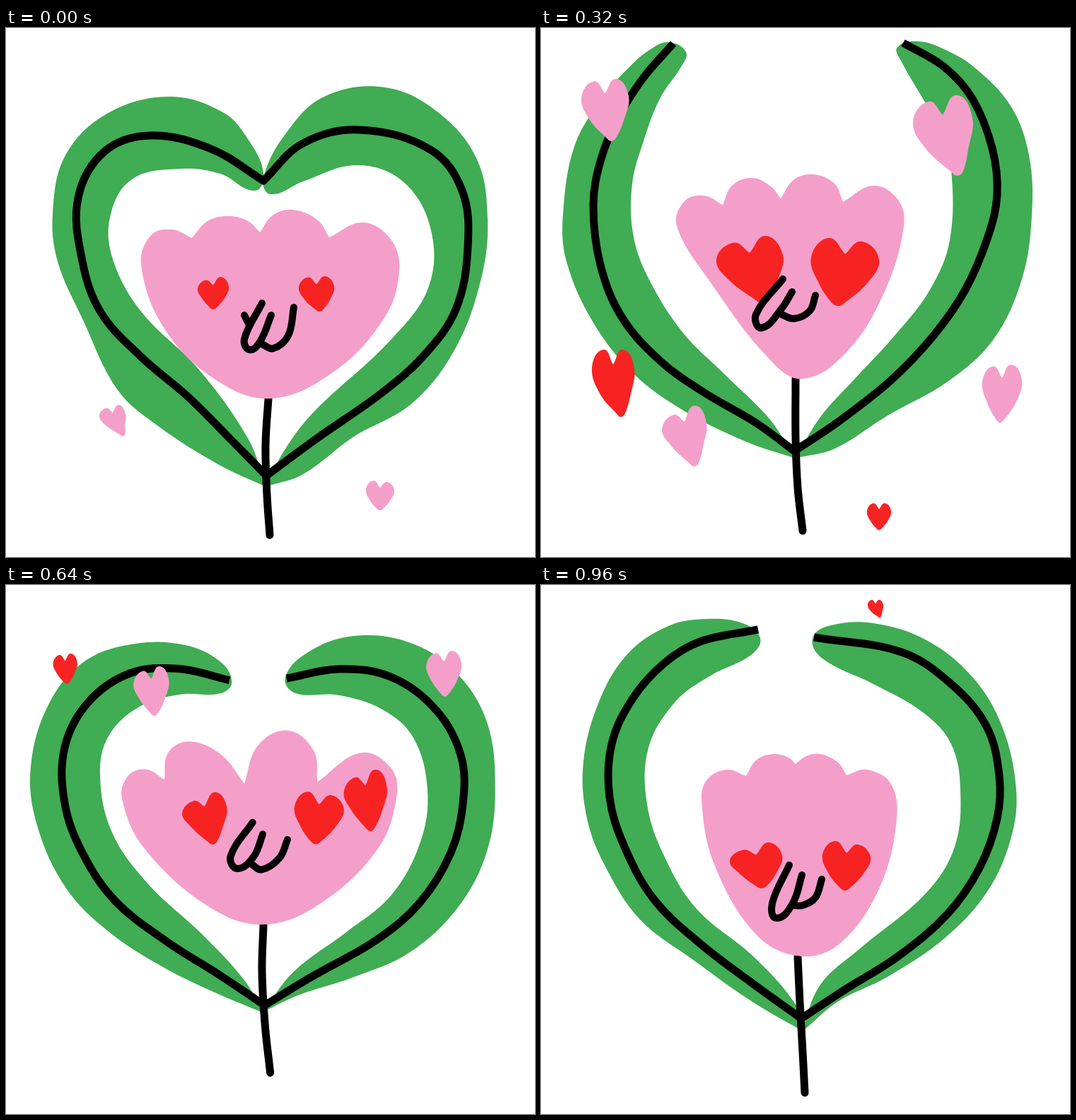
An HTML page with a canvas that plays this animation: 748x748 px, repeating every 1.04 s.

```html
<!DOCTYPE html>
<html lang="en">
<head>
<meta charset="utf-8">
<title>Flower in love</title>
<style>
html, body { margin: 0; width: 100%; height: 100%; overflow: hidden; background: #fff; }
canvas { display: block; width: 748px; height: 748px; }
</style>
</head>
<body>
<canvas id="stage" width="748" height="748"></canvas>
<script>
const ctx = document.getElementById('stage').getContext('2d');
const STEP = 80, STEPS = 13;
const GREEN = '#40ac53', PINK = '#f49fca', RED = '#f72323', BLACK = '#000';

// Hand-drawn poses: tracks[name] holds [step, values] in order.
const tracks = {};
function key(name, step, values) {
  (tracks[name] = tracks[name] || []).push([step, values]);
}

// Leaves: base, outer edge, tip, inner edge.
key('leafL', 0, [368,649, 300,617, 214,562, 158,512, 108,411, 73,330, 66,262, 84,180, 143,121, 231,97, 308,120, 344,160, 364,205, 352,230, 303,206, 248,199, 178,214, 147,268, 152,330, 192,402, 272,482, 342,580]);
key('leafL', 1, [365,623, 300,590, 220,540, 150,481, 90,400, 56,320, 52,250, 78,168, 130,109, 208,89, 280,95, 330,130, 355,172, 342,219, 295,202, 218,189, 160,207, 137,255, 150,325, 205,398, 275,470, 335,555]);
key('leafL', 3, [356,584, 290,558, 200,526, 120,478, 65,415, 28,335, 21,260, 42,170, 85,107, 140,73, 195,57, 235,51, 257,59, 250,74, 200,110, 158,166, 133,215, 127,270, 140,340, 180,408, 250,470, 325,524]);
key('leafL', 4, [358,608, 290,585, 200,540, 130,488, 73,415, 36,330, 31,265, 48,165, 90,95, 125,55, 155,30, 180,20, 205,34, 198,55, 168,100, 145,160, 129,220, 130,290, 150,350, 200,430, 260,490, 325,555]);
key('leafL', 6, [376,637, 300,599, 230,563, 160,508, 105,420, 68,330, 63,240, 100,160, 160,113, 235,102, 300,125, 335,170, 344,215, 320,236, 270,210, 220,198, 175,217, 151,270, 160,350, 210,425, 290,510, 350,585]);
key('leafL', 9, [358,589, 300,568, 220,530, 140,483, 75,433, 32,345, 21,265, 42,170, 90,103, 160,73, 230,65, 285,76, 307,98, 295,112, 235,127, 175,158, 130,212, 124,270, 145,350, 195,420, 270,485, 330,545]);
key('leafL', 12, [374,633, 300,590, 215,530, 140,473, 92,400, 65,330, 60,250, 82,165, 122,98, 180,58, 235,48, 285,54, 310,75, 297,99, 240,128, 190,165, 152,230, 150,310, 175,385, 220,458, 300,525, 358,590]);

key('leafR', 0, [366,649, 420,631, 490,579, 575,530, 636,452, 672,354, 681,270, 666,186, 612,120, 536,84, 450,97, 395,150, 364,212, 374,235, 420,217, 495,194, 560,216, 600,282, 598,365, 545,440, 435,543, 395,595]);
key('leafR', 1, [365,623, 412,606, 490,566, 570,517, 640,430, 679,340, 691,250, 674,155, 622,83, 520,45, 430,69, 380,120, 356,172, 362,210, 430,183, 505,172, 570,192, 612,260, 603,345, 555,425, 470,493, 398,557]);
key('leafR', 3, [358,580, 400,553, 480,536, 575,508, 650,460, 693,375, 712,280, 703,180, 660,98, 600,52, 545,32, 490,25, 458,43, 466,60, 520,93, 575,130, 610,185, 622,250, 610,330, 570,385, 495,455, 410,512]);
key('leafR', 4, [360,608, 415,595, 490,548, 575,500, 640,440, 680,355, 694,265, 690,180, 664,110, 612,55, 570,30, 535,19, 504,27, 510,48, 540,100, 565,145, 580,200, 578,300, 550,370, 500,435, 440,500, 395,550]);
key('leafR', 6, [370,637, 420,618, 490,589, 560,550, 625,490, 660,410, 671,330, 658,235, 610,158, 540,120, 470,117, 410,150, 373,205, 390,248, 440,231, 495,223, 548,238, 588,310, 582,390, 545,475, 480,525, 410,580]);
key('leafR', 9, [360,587, 410,561, 490,538, 575,505, 645,440, 690,360, 702,265, 690,170, 645,102, 580,60, 500,50, 435,68, 406,93, 418,105, 485,118, 550,152, 590,205, 600,280, 588,350, 545,420, 480,475, 405,530]);
key('leafR', 12, [368,633, 420,589, 490,554, 570,500, 630,435, 664,360, 672,290, 652,200, 610,130, 545,78, 470,54, 410,57, 384,75, 398,104, 470,140, 540,180, 580,225, 593,290, 585,370, 545,435, 450,515, 395,565]);

// Veins: base to tip.
key('veinL', 0, [368,633, 318,582, 258,522, 190,464, 134,402, 108,330, 102,240, 140,174, 205,152, 290,171, 364,216]);
key('veinL', 1, [364,612, 320,555, 250,495, 190,450, 135,398, 104,330, 92,240, 115,172, 190,129, 270,133, 355,177]);
key('veinL', 3, [358,565, 300,538, 220,503, 150,458, 105,408, 80,340, 63,270, 72,195, 110,127, 175,80, 250,55]);
key('veinL', 4, [358,598, 305,559, 230,515, 170,472, 115,410, 84,335, 74,250, 85,185, 110,125, 145,70, 187,22]);
key('veinL', 6, [374,625, 310,577, 230,515, 165,448, 115,368, 92,280, 108,205, 160,152, 235,139, 298,173, 342,222]);
key('veinL', 9, [360,578, 300,540, 225,498, 150,447, 105,385, 78,320, 71,240, 95,172, 145,118, 215,91, 303,91]);
key('veinL', 12, [368,613, 300,564, 225,507, 160,445, 118,370, 97,300, 100,225, 130,160, 175,110, 225,80, 307,63]);

key('veinR', 0, [368,633, 440,580, 530,517, 590,464, 636,398, 653,310, 645,230, 600,172, 500,144, 420,163, 364,216]);
key('veinR', 1, [364,612, 440,555, 530,502, 595,435, 645,365, 665,260, 645,180, 585,119, 500,110, 415,132, 355,177]);
key('veinR', 3, [358,563, 425,530, 515,488, 580,444, 630,390, 657,330, 667,260, 660,190, 625,120, 560,65, 462,37]);
key('veinR', 4, [360,597, 420,557, 495,498, 555,435, 600,370, 632,295, 645,235, 638,170, 610,100, 570,55, 512,21]);
key('veinR', 6, [374,625, 450,586, 540,527, 595,468, 637,385, 643,290, 620,225, 560,177, 490,169, 420,188, 374,214]);
key('veinR', 9, [360,580, 425,537, 515,490, 580,440, 625,375, 648,315, 655,250, 635,180, 575,112, 500,84, 408,91]);
key('veinR', 12, [368,613, 430,572, 505,525, 575,465, 620,400, 645,330, 648,270, 630,200, 580,140, 510,95, 386,74]);

key('stem', 0, [371,524, 367,590, 369,660, 373,717]);
key('stem', 1, [361,495, 360,560, 366,645, 380,704]);
key('stem', 3, [364,437, 359,520, 361,600, 368,665]);
key('stem', 4, [360,495, 360,580, 363,650, 370,711]);
key('stem', 6, [368,522, 370,580, 373,650, 373,719]);
key('stem', 9, [362,460, 358,530, 363,610, 374,675]);
key('stem', 12, [363,526, 366,590, 370,660, 373,718]);

// Petals: clockwise from the first notch; notches are points 0, 4 and 8.
key('petals', 0, [263,297, 285,273, 315,266, 342,273, 359,289, 377,265, 405,257, 440,271, 457,296, 505,275, 545,300, 556,345, 535,410, 465,485, 373,524, 290,493, 222,422, 191,335, 205,293, 235,285]);
key('petals', 1, [251,291, 265,252, 300,235, 335,252, 348,281, 365,250, 405,233, 437,250, 448,278, 495,257, 537,280, 549,330, 525,400, 465,462, 368,496, 285,467, 215,390, 177,300, 188,272, 222,265]);
key('petals', 3, [214,245, 217,200, 255,180, 315,207, 357,262, 375,200, 425,166, 460,195, 463,229, 515,215, 555,245, 560,285, 520,318, 432,394, 367,436, 290,392, 178,333, 150,288, 163,253, 190,244]);
key('petals', 4, [257,250, 270,223, 298,212, 325,224, 339,241, 357,215, 385,207, 415,220, 427,246, 470,223, 505,243, 513,280, 487,370, 435,455, 370,496, 320,465, 240,360, 192,280, 203,245, 230,237]);
key('petals', 6, [262,314, 272,275, 300,260, 333,276, 355,314, 378,272, 420,257, 455,278, 467,318, 515,284, 552,305, 556,340, 533,410, 460,490, 375,522, 290,494, 225,425, 190,335, 198,293, 225,282]);
key('petals', 9, [205,256, 208,218, 240,202, 290,222, 328,264, 345,205, 387,180, 425,212, 427,259, 495,214, 540,235, 551,275, 525,350, 445,425, 362,459, 285,435, 180,345, 151,285, 160,258, 185,250]);
key('petals', 12, [290,270, 305,247, 330,239, 350,244, 360,253, 375,242, 395,239, 420,251, 432,269, 460,261, 494,280, 503,330, 480,425, 425,505, 368,525, 305,495, 245,395, 227,305, 235,275, 263,261]);

// Mouth: a loop (5 points), a hook (4) and a short tick (2).
key('mouth', 0, [362,389, 337,440, 345,455, 360,442, 375,406, 362,447, 378,453, 399,435, 407,395, 337,406, 344,420]);
key('mouth', 1, [351,350, 328,400, 332,417, 350,405, 364,375, 352,412, 367,425, 390,415, 402,380, 327,380, 333,391]);
key('mouth', 3, [345,311, 320,358, 327,373, 350,355, 362,315, 346,363, 365,372, 385,355, 392,332, 335,330, 330,338]);
key('mouth', 4, [342,355, 304,405, 312,424, 340,397, 355,373, 340,405, 358,411, 380,400, 388,378, 322,381, 318,386]);
key('mouth', 6, [356,387, 313,430, 322,449, 352,430, 369,405, 348,433, 365,439, 390,428, 402,406, 334,408, 330,412]);
key('mouth', 9, [345,310, 320,360, 330,377, 350,360, 360,326, 346,375, 360,384, 385,365, 396,337, 333,336, 330,341]);
key('mouth', 12, [351,396, 327,450, 333,471, 356,450, 369,410, 357,453, 370,453, 388,442, 397,416, 340,420, 338,425]);

// Hearts: centre, width, height, tip shift, lobe tilt.
key('eyeL', 0, [293,375, 44,46, 0,.1]);
key('eyeL', 1, [280.5,334.5, 87,101, .13,.17]);
key('eyeL', 3, [283.5,299, 49,46, .15,.27]);
key('eyeL', 4, [295,342, 94,96, .2,.1]);
key('eyeL', 6, [290,372, 41,42, .13,.2]);
key('eyeL', 9, [276,309, 74,90, .2,.15]);
key('eyeL', 12, [304,396.5, 74,65, .1,.16]);

key('eyeR', 0, [439,376, 50,50, .08,.03]);
key('eyeR', 1, [446,330, 102,108, -.03,-.09]);
key('eyeR', 3, [435,290, 50,44, 0,-.04]);
key('eyeR', 4, [430,345, 96,96, -.1,-.05]);
key('eyeR', 6, [434.5,383, 45,45, 0,-.04]);
key('eyeR', 9, [447,302.5, 82,89, -.1,-.08]);
key('eyeR', 12, [432,397, 68,70, -.03,-.07]);

key('float1', 0, [150.5,555, 37,44, .38,.1]);
key('float1', 1, [121,512.5, 54,59, .36,.14]);
key('float1', 3, [80,206.5, 80,109, .03,0]);
key('float1', 4, [90.5,116, 67,88, .13,.04]);
key('float1', 5, [97,42, 34,42, .1,.05]);

key('float2', 0, [529,661, 40,42, 0,-.05]);
key('float2', 1, [550,607, 52,68, -.25,-.04]);
key('float2', 3, [599,313.5, 84,107, -.02,0]);
key('float2', 4, [568,152, 84,114, .24,.08]);
key('float2', 5, [557,60, 40,50, .1,.05]);

key('float3', 2, [132,664, 34,40, .2,.03]);
key('float3', 3, [121.5,600.5, 53,71, .24,.03]);
key('float3', 4, [102,502.5, 60,95, .18,0]);
key('float3', 6, [66,279.5, 52,81, .2,.06]);
key('float3', 9, [92.5,38, 25,24, 0,.04]);

key('float4', 3, [218.5,668, 51,56, .24,.04]);
key('float4', 4, [202.5,577, 63,86, .22,.15]);
key('float4', 6, [174,359, 62,100, .15,.05]);
key('float4', 9, [221,45.5, 44,55, .05,.12]);

key('float5', 2, [645,677, 28,36, -.05,0]);
key('float5', 3, [648.5,611, 39,64, -.08,0]);
key('float5', 4, [652,517, 56,82, -.05,.03]);
key('float5', 6, [654.5,303, 75,104, .03,.1]);
key('float5', 9, [601.5,36.5, 37,45, .03,.03]);

key('float6', 4, [478,691, 34,38, 0,0]);
key('float6', 6, [500.5,553.5, 55,81, .06,.04]);
key('float6', 9, [512,180, 64,90, .14,.17]);
key('float6', 12, [473,33.5, 22,25, .25,0]);

const floats = { float1: PINK, float2: PINK, float3: RED, float4: PINK, float5: PINK, float6: RED };

// Values of a track at a step, blended between poses; null outside its span.
function at(name, step) {
  const keys = tracks[name];
  const next = keys.findIndex(k => k[0] >= step);
  if (next < 0 || keys[0][0] > step) return null;
  const [b, to] = keys[next];
  if (b === step) return to;
  const [a, from] = keys[next - 1];
  const u = (step - a) / (b - a);
  return from.map((v, i) => v + (to[i] - v) * u);
}

function points(list) {
  const out = [];
  for (let i = 0; i < list.length; i += 2) out.push([list[i], list[i + 1]]);
  return out;
}

// Smooth curve through pts, continuing the current path if joined.
function spline(pts, joined) {
  const dirs = pts.map((p, i) => {
    const a = pts[i - 1] || p, b = pts[i + 1] || p;
    const dx = b[0] - a[0], dy = b[1] - a[1], d = Math.hypot(dx, dy) || 1;
    return [dx / d, dy / d];
  });
  if (!joined) ctx.moveTo(...pts[0]);
  for (let i = 1; i < pts.length; i++) {
    const [x0, y0] = pts[i - 1], [x1, y1] = pts[i];
    const r = Math.hypot(x1 - x0, y1 - y0) * 0.36;
    const [u, v] = dirs[i - 1], [s, t] = dirs[i];
    ctx.bezierCurveTo(x0 + u * r, y0 + v * r, x1 - s * r, y1 - t * r, x1, y1);
  }
}

function fill(color, ...curves) {
  ctx.beginPath();
  curves.forEach((c, i) => spline(c, i > 0));
  ctx.closePath();
  ctx.fillStyle = color;
  ctx.fill();
}

function stroke(pts, width, cap = 'round') {
  ctx.beginPath();
  spline(pts);
  ctx.lineWidth = width;
  ctx.lineCap = cap;
  ctx.stroke();
}

function heart([x, y, w, h, tip, tilt], color) {
  const l = Math.max(tilt, 0), r = Math.max(-tilt, 0);
  const place = list => points(list).map(([a, b]) => [x + a * w, y + b * h]);
  const notch = -.28 + .3 * (l + r);
  fill(color, place([
    0, notch, -.24, -.5 + l, -.5, -.22 + l * .7, -.36 + tip * .3, .16, tip - .1, .45,
    tip, .5, tip + .1, .45, .36 + tip * .3, .16, .5, -.22 + r * .7, .24, -.5 + r, 0, notch
  ]));
}

function draw(step) {
  const get = name => points(at(name, step));
  ctx.fillStyle = '#fff';
  ctx.fillRect(0, 0, 748, 748);
  ctx.strokeStyle = BLACK;
  ctx.lineJoin = 'round';

  for (const name of ['leafL', 'leafR']) {
    const leaf = get(name);
    fill(GREEN, [...leaf, leaf[0]]);
  }

  const left = get('veinL'), right = get('veinR');
  const [a, b] = [left, right].map(v => v[v.length - 1]);
  const cap = Math.hypot(a[0] - b[0], a[1] - b[1]) < 12 ? 'round' : 'butt';
  stroke(left, 11, cap);
  stroke(right, 11, cap);
  stroke(get('stem'), 11);

  const p = get('petals');
  fill(PINK, p.slice(0, 5), p.slice(4, 9), [...p.slice(8), p[0]]);

  heart(at('eyeL', step), RED);
  heart(at('eyeR', step), RED);

  const m = get('mouth');
  stroke(m.slice(0, 5), 10);
  stroke(m.slice(5, 9), 10);
  if (step < 3) stroke(m.slice(9), 10);

  for (const name in floats) {
    const f = at(name, step);
    if (f) heart(f, floats[name]);
  }
}

function tick() {
  draw(Math.floor(performance.now() / STEP) % STEPS);
  requestAnimationFrame(tick);
}
tick();
</script>
</body>
</html>
```
